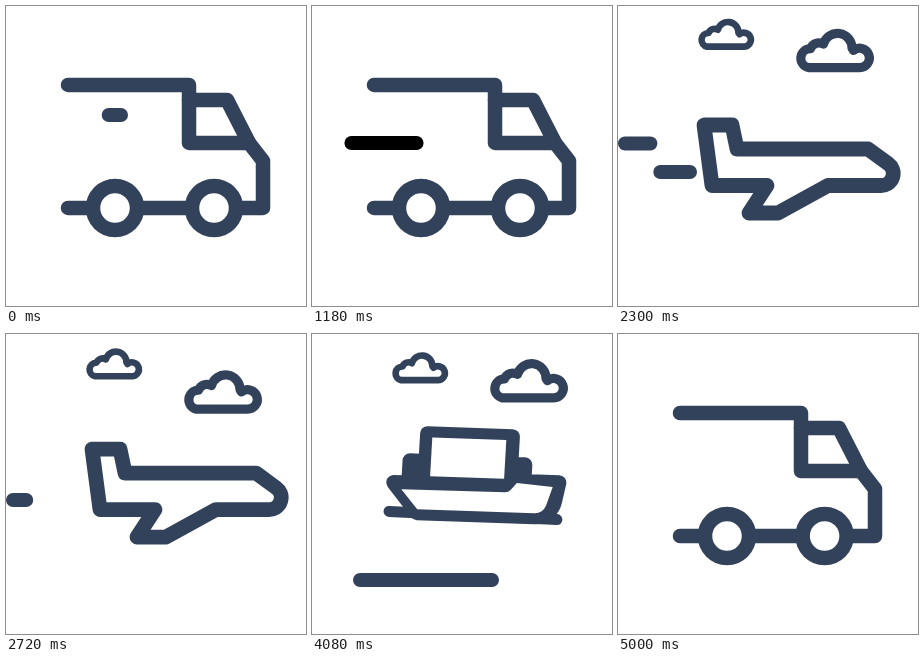
Write an HTML page with a canvas that moves like this. It is 300 px wide and 300 px high and loops after 5020 ms.

```html
<!DOCTYPE html>
<html lang="en">
<head>
<meta charset="utf-8">
<title>Delivery</title>
<style>
html, body { margin: 0; width: 100%; height: 100%; overflow: hidden; background: #fff; }
canvas { display: block; width: 300px; height: 300px; }
</style>
</head>
<body>
<canvas></canvas>
<script>
const LOOP = 5020, NAVY = '#32425b', TAU = Math.PI * 2, DASH_TIME = 560;
const canvas = document.querySelector('canvas');
const ctx = canvas.getContext('2d');
const dpr = window.devicePixelRatio || 1;
canvas.width = canvas.height = 300 * dpr;

const clamp = x => Math.max(0, Math.min(1, x));
const ramp = (t, a, b) => { const p = clamp((t - a) / (b - a)); return p * p * (3 - 2 * p); };
const wave = (t, peak, period) => Math.cos(TAU * (t - peak) / period);
const lerp = (a, b, k) => a + (b - a) * k;

// A point is [x, y, corner radius]; the radius may be left out.
const mix = (a, b, k) => a.map((p, i) => [0, 1, 2].map(n => lerp(p[n] || 0, b[i][n] || 0, k)));
const shift = (pts, dy) => pts.map(([x, y, r]) => [x, y + dy, r]);
const scale = (pts, cx, cy, kx, ky = kx) =>
  pts.map(([x, y, r = 0]) => [lerp(cx, x, kx), lerp(cy, y, ky), r * kx]);
const lean = (pts, k) => pts.map(([x, y, r]) =>
  [x - k * .09 * (y - 186), y + k * (.06 * (x - 160) - .13 * (y - 186) - 9), r]);

// Adds points along the closing edge, so that all outlines can morph into each other.
function pad(pts, count = 12) {
  const gap = count - pts.length + 1, end = pts[pts.length - 1];
  const extra = Array.from({ length: gap - 1 }, (_, i) =>
    [0, 1].map(n => lerp(end[n], pts[0][n], (i + 1) / gap)));
  return [...pts, ...extra];
}

const frameLine = [[62,79], [183,79], [183,94], [221,94], [243,137], [257,155], [257,202], [160,202], [62,202]];
const windowLine = [[183,94], [183,137], [243,137]];
const truck = pad(frameLine);
const plane = pad([[86,114], [114,114], [119,138], [250,138], [300,174.5,12], [210,174.5],
  [160,202], [131,202], [149,174.5], [94,174.5]]);
const ship = [[111,100], [196,100], [196,130], [210,130], [210,148], [245,148],
  [239,186,20], [105,186], [80,154], [95,154], [95,130], [111,130]];
const deck = [[77,185.5], [245,188]];
const hullHole = [[88,161], [195,160.5,8], [203,150], [239,153], [231,182,12], [105,182]];
const cabinHole = [[116,104], [190,104], [190,146], [116,146]];
const cloud = new Path2D('M14 39.5A9.6 9.6 0 0 1 16 20.5A9 9 0 0 1 29 16A14.5 14.5 0 0 1 57.5 20' +
  'L59 22.3A9.7 9.7 0 1 1 65 39.5Z');

// Each vehicle sends out evenly spaced speed lines.
const dashGroups = [
  { start: 0, step: 490, count: 3, y: 109, dy: 14, x: 115, dist: 124 },
  { start: 1840, step: 330, count: 2, y: 137.5, dy: 28.5, x: 72, dist: 53 },
  { start: 3010, step: 770, count: 2, y: 246, dy: 0, x: 275, dist: 280 }
];

function trace(pts, closed) {
  ctx.beginPath();
  ctx.moveTo(...pts[0].slice(0, 2));
  pts.slice(1).forEach(([x, y, r = 0], i) => {
    const [nx, ny] = pts[(i + 2) % pts.length];
    if (r) ctx.arcTo(x, y, nx, ny, r);
    else ctx.lineTo(x, y);
  });
  if (closed) ctx.closePath();
}

function line(pts, width, closed = false, color = NAVY) {
  trace(pts, closed);
  ctx.lineWidth = width;
  ctx.strokeStyle = color;
  ctx.stroke();
}

function fill(pts, color) {
  trace(pts, true);
  ctx.fillStyle = color;
  ctx.fill();
}

function drawCloud(x, y, size, grow) {
  if (grow <= 0) return;
  ctx.save();
  ctx.translate(x + 39.5 * size, y + 22 * size);
  ctx.scale(size * grow, size * grow);
  ctx.translate(-39.5, -22);
  ctx.lineWidth = 9.2;
  ctx.strokeStyle = NAVY;
  ctx.stroke(cloud);
  ctx.restore();
}

function drawWheel(x, size) {
  if (size <= 0) return;
  ctx.beginPath();
  ctx.arc(x, 202, 22 * size, 0, TAU);
  ctx.lineWidth = 14.5 * size;
  ctx.fillStyle = '#fff';
  ctx.strokeStyle = NAVY;
  ctx.fill();
  ctx.stroke();
}

function drawVehicle(t) {
  const toPlane = ramp(t, 1340, 1640), toShip = ramp(t, 3140, 3440), toTruck = ramp(t, 4640, 4860);
  const isTruck = toPlane === 0 || toTruck === 1;
  const sway = t < 3560 ? 0 : t > 4640 ? 1 : (1 - wave(t, 3560, 720)) / 2;
  const bounce = t < 1640 ? -10 * Math.sin(TAU * t / 590) * (1 - toPlane) : 0;
  const bob = -7 * wave(t, 1850, 1200);

  let body = mix(shift(truck, bounce), shift(plane, bob), toPlane);
  body = mix(body, lean(ship, sway), toShip);
  body = mix(body, truck, toTruck);

  // How far the solid silhouette has opened into an outline.
  const open = 1 - ramp(t, 1240, 1400) + ramp(t, 1860, 2100) - ramp(t, 2940, 3140) + ramp(t, 4780, 4980);
  fill(body, NAVY);
  if (open > 0) {
    ctx.save();
    trace(body, true);
    ctx.clip();
    fill(scale(body, 150, 158, open), '#fff');
    ctx.restore();
  }
  if (isTruck) {
    line(shift(frameLine, bounce), 14.5);
    line(shift(windowLine, bounce), 14.5);
  } else {
    line(body, 14.8, true);
  }

  const deckSize = toShip * (1 - toTruck);
  if (deckSize > 0) line(lean(scale(deck, 160, 186, deckSize, 1), sway), 11);
  const hull = ramp(t, 3400, 3530) - ramp(t, 4460, 4600);
  if (hull > 0) fill(lean(scale(hullHole, 155, 172, hull), sway), '#fff');
  const cabin = ramp(t, 3570, 3800) - ramp(t, 4480, 4720);
  if (cabin > 0) fill(lean(scale(cabinHole, 116, 104, cabin, Math.sqrt(cabin)), sway), '#fff');

  const wheels = 1 - ramp(t, 1240, 1400) + ramp(t, 4850, 4960);
  drawWheel(109, wheels);
  drawWheel(t < 2000 ? 208 : 208 - 40 * (1 - ramp(t, 4850, 5020)), wheels);
}

function drawDashes(t) {
  for (const { start, step, count, y, dy, x, dist } of dashGroups) {
    for (let i = 0; i < count; i++) {
      const p = (t - start - i * step) / DASH_TIME;
      if (p < 0 || p > 1) continue;
      const tail = x - dist * clamp((p - .3) / .7), head = x - 12 - dist * clamp(p / .7);
      line([[tail, y + i * dy], [head, y + i * dy]], 14, false, i === 2 ? '#000' : NAVY);
    }
  }
}

function draw(t) {
  ctx.setTransform(dpr, 0, 0, dpr, 0, 0);
  ctx.fillStyle = '#fff';
  ctx.fillRect(0, 0, 300, 300);
  ctx.lineCap = ctx.lineJoin = 'round';
  const clouds = ramp(t, 1640, 1800) - ramp(t, 4700, 4850);
  drawCloud(79 + 3 * (1 - ramp(t, 1800, 2100)), 18 + 6.2 * wave(t, 3520, 2180), .72, clouds);
  drawCloud(176.5, 34 + 13.7 * wave(t, 3240, 2250), 1, clouds);
  drawVehicle(t);
  drawDashes(t);
}

const begin = performance.now();
function frame() {
  draw((performance.now() - begin) % LOOP);
  requestAnimationFrame(frame);
}
frame();
</script>
</body>
</html>
```
